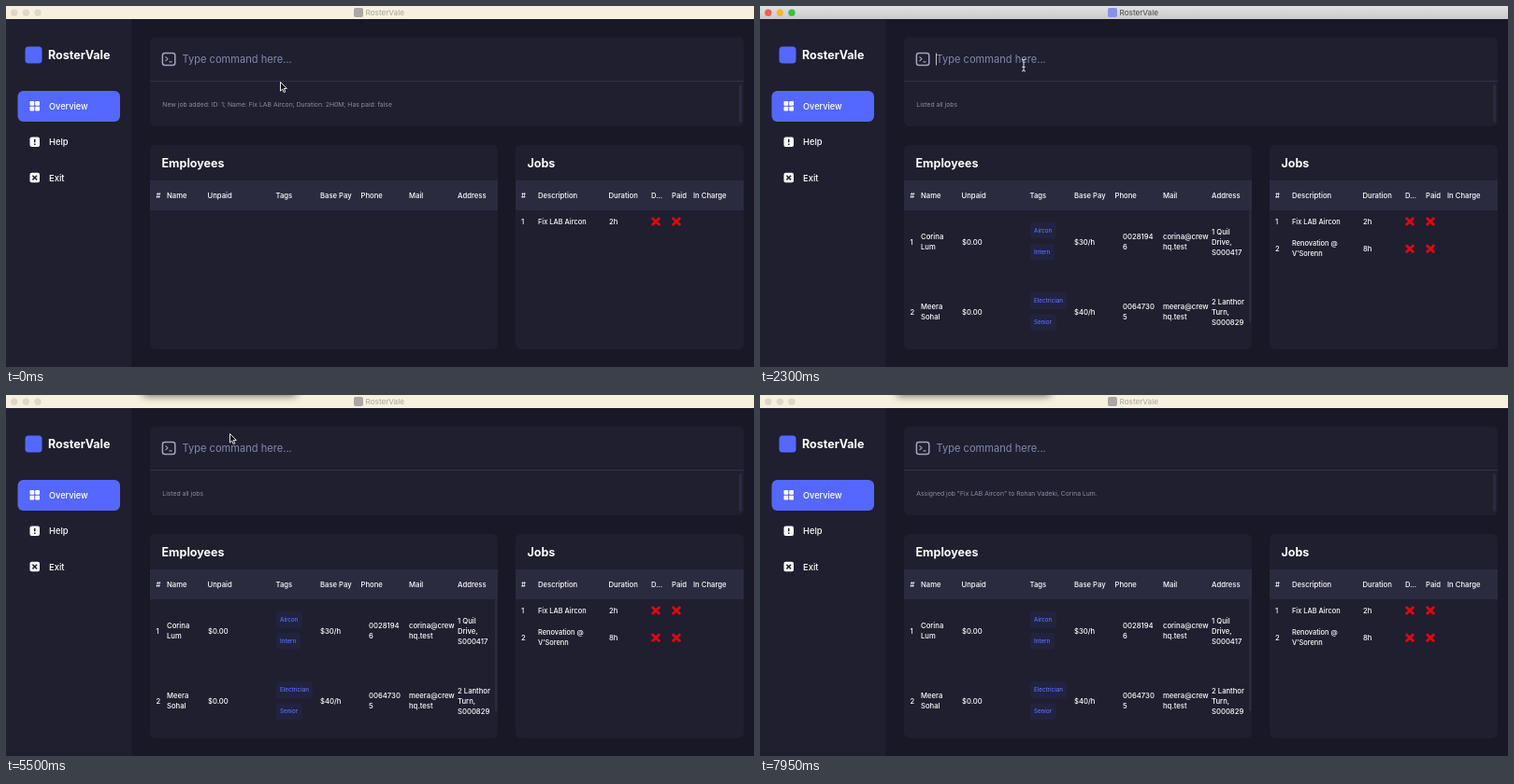
An HTML page that plays this animation: 800 by 387 pixels, repeating every 8000 ms.

```html
<!DOCTYPE html>
<html lang="en">
<head>
<meta charset="utf-8">
<title>Roster dashboard</title>
<style>
  html, body { margin: 0; width: 100%; height: 100%; overflow: hidden; background: #181827; }
  svg { display: block; width: 800px; height: 387px; font-family: Inter, Roboto, sans-serif; }
  text { white-space: pre; }
</style>
</head>
<body>
<svg id="stage" viewBox="0 0 800 387"></svg>
<script>
const stage = document.getElementById('stage');
const CARD = '#1f1f30', BAND = '#2b2b40', BLUE = '#5468ff', WHITE = '#fff';

// Text is placed by its left edge and the middle of its capitals.
const text = (x, y, str, size = 7.7, weight = 500, fill = WHITE, id = '') =>
  `<text x="${x}" y="${y + size * 0.36}" font-size="${size}" font-weight="${weight}" fill="${fill}"${id && ` id="${id}"`}>${str}</text>`;
const box = (x, y, w, h, fill, r = 0) =>
  `<rect x="${x}" y="${y}" width="${w}" height="${h}" rx="${r}" fill="${fill}"/>`;
const lines = (x, y, list, size) =>
  list.map((str, i) => text(x, y + (i - (list.length - 1) / 2) * 11, str, size)).join('');
const heads = list => list.map(([x, str]) => text(x, 203.5, str)).join('');
const cross = (x, y) =>
  `<path d="M${x - 4.2} ${y - 4}l8.4 8m0 -8l-8.4 8" stroke="#e00812" stroke-width="2.8"/>`;
const tag = (y, w, str) => box(289, y - 9, w, 18, '#21233f', 3) + text(293, y, str, 6.2, 500, '#5a6fff');

function employee(y, { id, name, tags, pay, phone, mail, address }) {
  return text(160.5, y, id) + lines(172, y, name) + text(216, y, '$0.00') +
    tags.map(([str, w], i) => tag(y - 12 + i * 23, w, str)).join('') +
    text(336, y, pay) + lines(388, y, phone) + lines(431, y, mail) + lines(483, y, address);
}

const job = (y, id, title, hours) =>
  text(551, y, id) + lines(569, y, title, 7.4) + text(645, y, hours) + cross(695, y) + cross(717, y);

function titleBar() {
  const lights = fills => fills.map((c, i) => `<circle cx="${8.8 + i * 12.6}" cy="7.2" r="3.7" fill="${c}"/>`).join('');
  return `
    <g id="idleBar">${box(0, 0, 800, 14, '#f6f0df')}${lights(Array(3).fill('#ddd8c9'))}
      ${box(372, 2, 10, 10, '#aaa6a4', 2)}${text(384.5, 7.4, 'RosterVale', 8.2, 400, '#a9a59b')}</g>
    <g id="liveBar">${box(0, 0, 800, 14, 'url(#metal)')}${lights(['#ff5b50', '#f8b92e', '#30c53f'])}
      ${box(372, 2, 10, 10, '#8592ea', 2)}${text(384.5, 7.4, 'RosterVale', 8.2, 400, '#454545')}</g>
    <rect id="shade" x="146" y="-9" width="165" height="10" rx="4" fill="#000" opacity=".55" filter="url(#soft)"/>`;
}

function sidebar() {
  const tiles = [0, 1, 2, 3].map(i => box(25.5 + (i % 2) * 5.7, 102 + (i >> 1) * 5.7, 4.8, 4.8, WHITE, 1)).join('');
  return box(0, 14, 134.5, 373, CARD) +
    box(20.5, 43.5, 18, 18, BLUE, 3.5) + text(45, 52.5, 'RosterVale', 12.5, 700) +
    box(12.5, 91, 109.5, 33, BLUE, 6) + tiles + text(46, 107.3, 'Overview', 9.2) +
    box(25.5, 140.5, 10.5, 10.5, WHITE, 2) +
    `<path d="M30.75 142.7v3.6m0 1.3v1.5" stroke="${CARD}" stroke-width="1.5"/>` + text(46, 145.8, 'Help', 9.4) +
    box(25.5, 178.8, 10.5, 10.5, WHITE, 2) +
    `<path d="M28.4 181.7l4.7 4.7m0 -4.7l-4.7 4.7" stroke="${CARD}" stroke-width="1.5"/>` + text(46, 184.2, 'Exit', 9.4);
}

function commandCard() {
  return box(154, 33.5, 635, 95.5, CARD, 6) + box(154, 80, 635, 1.2, '#303046') +
    box(784, 84, 3, 41, BAND, 1.5) +
    `<rect x="167.4" y="50.4" width="13.4" height="13.2" rx="2.5" fill="none" stroke="#a3a4bb" stroke-width="1.5"/>
     <path d="M170.5 54.3l2.5 2.4l-2.5 2.4m4 .8h3" fill="none" stroke="#a3a4bb" stroke-width="1.1"/>` +
    text(188.5, 57, '', 11.1, 400, WHITE, 'command') +
    `<rect id="caret" y="50.5" width=".9" height="13" fill="#d6d6e0"/>` +
    text(167.3, 106, '', 6.8, 400, '#8e8ea3', 'result');
}

function tables() {
  const first = {
    id: '1', name: ['Corina', 'Lum'], tags: [['Aircon', 28], ['Intern', 26]], pay: '$30/h',
    phone: ['0028194', '6'], mail: ['corina@crew', 'hq.test'], address: ['1 Quil', 'Drive,', 'S000417']
  };
  const second = {
    id: '2', name: ['Meera', 'Sohal'], tags: [['Electrician', 39], ['Senior', 28]], pay: '$40/h',
    phone: ['0064730', '5'], mail: ['meera@crew', 'hq.test'], address: ['2 Lanthor', 'Turn,', 'S000829']
  };
  return box(154, 149, 372, 219, CARD, 6) + text(166.5, 168.5, 'Employees', 12.5, 700) +
    box(154, 187, 372, 32, BAND) +
    heads([[160.5, '#'], [172, 'Name'], [215.5, 'Unpaid'], [288.5, 'Tags'], [336, 'Base Pay'],
           [379.5, 'Phone'], [431, 'Mail'], [483, 'Address']]) +
    `<g id="staff">${employee(252.8, first)}${employee(328.2, second)}${box(523, 219, 2.5, 120, BAND, 1.2)}</g>` +
    box(545, 149, 244, 219, CARD, 6) + text(557.5, 168.5, 'Jobs', 12.5, 700) +
    box(545, 187, 244, 32, BAND) +
    heads([[551, '#'], [569, 'Description'], [644.5, 'Duration'], [690, 'D...'], [712, 'Paid'], [735, 'In Charge']]) +
    job(231, '1', ['Fix LAB Aircon'], '2h') +
    `<g id="newJob">${job(260.3, '2', ['Renovation @', "V'Sorenn"], '8h')}</g>`;
}

stage.innerHTML = `
  <defs>
    <linearGradient id="metal" x2="0" y2="1"><stop stop-color="#e2e1e1"/><stop offset="1" stop-color="#cbcaca"/></linearGradient>
    <filter id="soft" x="-20%" y="-200%" width="140%" height="500%"><feGaussianBlur stdDeviation="4"/></filter>
  </defs>
  ${box(0, 0, 800, 387, '#181827')}${sidebar()}${commandCard()}${tables()}${titleBar()}
  <path id="arrow" d="M0 0v9.6l2.2 -2l1.5 3.4l1.6 -.7l-1.5 -3.3h3z" fill="#111" stroke="#fff" stroke-width=".9"/>
  <path id="beam" d="M-2 -6.5q2 0 2 1.6v9.8q0 1.6 -2 1.6m4 -13q-2 0 -2 1.6m0 9.8q0 1.6 2 1.6m-3.6 -4.6h3.2"
    fill="none" stroke="#e4e4ea" stroke-width="1"/>`;

const part = id => document.getElementById(id);
const show = (id, on) => part(id).setAttribute('visibility', on ? 'visible' : 'hidden');
const within = (t, a, b) => t >= a && t < b;

const entries = [
  { from: 250, to: 900, enter: 1000, str: "job n/Renovation @ V'Sorenn d/8" },
  { from: 1600, to: 1950, enter: 2100, str: 'joblist' },
  { from: 5750, to: 6200, enter: 6600, str: 'assign 1 i/1 i/5' }
];
const results = [
  [0, 'New job added: ID: 1; Name: Fix LAB Aircon; Duration: 2H0M; Has paid: false'],
  [1000, "New job added: ID: 2; Name: Renovation @ V'Sorenn; Duration: 8H0M; Has paid: false"],
  [2100, 'Listed all jobs'],
  [6600, 'Assigned job "Fix LAB Aircon" to Rohan Vadeki, Corina Lum.']
];
const pointerPath = [
  [0, 293.5, 81.5], [200, 282, 63.5], [2650, 282, 63.5], [3050, 230, -12],
  [5250, 225, -12], [5500, 239.5, 41.5], [5700, 296, 70], [6900, 296, 70], [7500, 232, -12], [8000, 232, -12]
];

function pointerAt(t) {
  const i = pointerPath.findIndex(p => p[0] > t);
  const [t0, x0, y0] = pointerPath[i - 1], [t1, x1, y1] = pointerPath[i];
  const u = (t - t0) / (t1 - t0), k = u * u * (3 - 2 * u);
  return [x0 + (x1 - x0) * k, y0 + (y1 - y0) * k];
}

function draw(t) {
  const live = within(t, 150, 3050) || within(t, 5650, 7750);
  const entry = entries.find(e => within(t, e.from, e.enter));
  const typed = entry
    ? entry.str.slice(0, Math.ceil(entry.str.length * Math.min(1, (t - entry.from + 50) / (entry.to - entry.from))))
    : '';
  const command = part('command');
  command.textContent = typed || 'Type command here...';
  command.setAttribute('fill', typed ? WHITE : '#8388ac');
  part('caret').setAttribute('x', 188 + (typed ? command.getComputedTextLength() + 0.5 : 0));
  part('result').textContent = results.filter(r => r[0] <= t).pop()[1];

  show('caret', live);
  show('liveBar', live);
  show('idleBar', !live);
  show('shade', !live && t > 3000);
  show('staff', t >= 1000);
  show('newJob', t >= 1000);

  const [x, y] = pointerAt(t), beam = within(t, 200, 2650);
  for (const id of ['arrow', 'beam']) part(id).setAttribute('transform', `translate(${x} ${y})`);
  show('beam', beam);
  show('arrow', !beam);
}

const start = performance.now();
function tick() {
  const t = (performance.now() - start) % 8000;
  draw(Math.floor(t / 50) * 50);
  requestAnimationFrame(tick);
}
tick();
</script>
</body>
</html>
```
